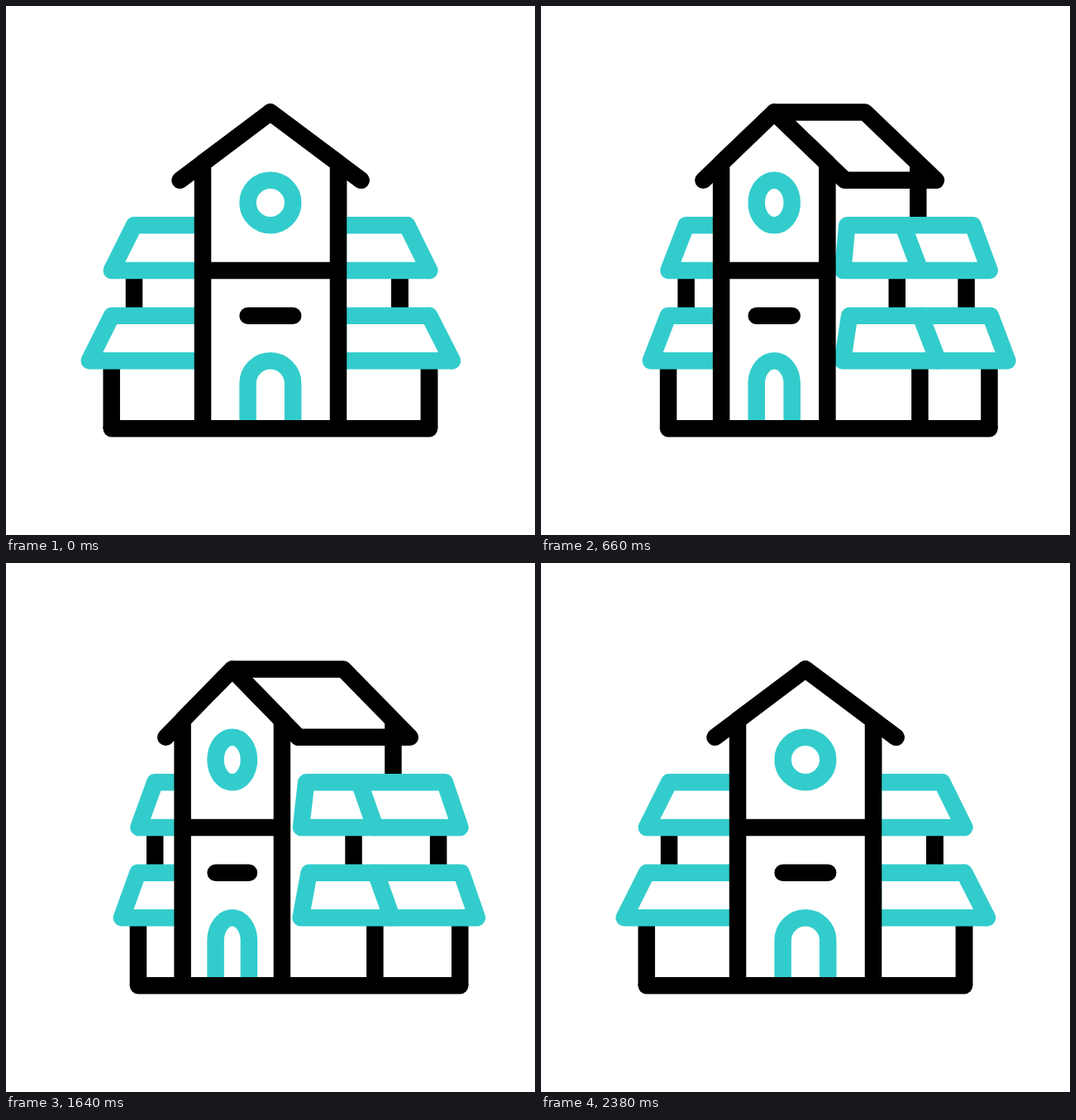
An HTML page without scripts that plays this animation: 640x640 px, repeating every 2.4 s.

```html
<!DOCTYPE html>
<html lang="en">
<head>
<meta charset="utf-8">
<title>Turning house</title>
<style>
  html, body { margin: 0; width: 100%; height: 100%; overflow: hidden; background: #fff; }
  svg { display: block; width: 100vw; height: 100vh; }
  path {
    fill: none;
    stroke: #000;
    stroke-width: 20.5;
    stroke-linejoin: round;
    animation: turn 1200ms cubic-bezier(.78, 0, .26, 1) -10ms infinite alternate;
  }
  .teal { stroke: #3cc; }
  .solid { fill: #fff; }
  .round { stroke-linecap: round; }
  /* each path morphs from its d to its turned pose */
  @keyframes turn { to { d: var(--to); } }
</style>
</head>
<body>
<svg viewBox="0 0 640 640">
  <!-- left wing -->
  <path d="M155 320V375" style="--to:path('M185.8 320V375')"/>
  <path d="M127.7 430V511" style="--to:path('M167.1 430V511')"/>
  <path class="teal" d="M238 265.3H155L127.7 320H238"
    style="--to:path('M208.2 265.3H185.8L167.6 320H208.2')"/>
  <path class="teal" d="M238 374.7H128L100.7 429.2H238"
    style="--to:path('M208.2 374.7H166.5L148.6 429.2H208.2')"/>

  <!-- main roof and back wall -->
  <path class="solid" d="M319.8 128.6H320L429.5 210.8H429.5Z"
    style="--to:path('M263.5 128.6H427.9L502 210.8H337Z')"/>
  <path d="M402 189V265" style="--to:path('M483.2 189V265')"/>

  <!-- right wing -->
  <path d="M476.4 320V375" style="--to:path('M408.1 320V375')"/>
  <path d="M476.4 320V375" style="--to:path('M533.5 320V375')"/>
  <path d="M512 430V511" style="--to:path('M431.8 430V511')"/>
  <path d="M512 430V511" style="--to:path('M557.5 430V511')"/>
  <path class="teal solid" d="M485 265.3H485.3L512.3 320H512Z"
    style="--to:path('M414.6 265.3H541L557.7 320H432Z')"/>
  <path class="teal solid" d="M402 265.3H485L512 320H402Z"
    style="--to:path('M354.5 265.3H414.6L432 320H347Z')"/>
  <path class="teal solid" d="M512 374.7H512L539.8 429.2H539.7Z"
    style="--to:path('M433 374.7H559.6L576.5 429.2H450.6Z')"/>
  <path class="teal solid" d="M402 374.7H512L539.7 429.2H402Z"
    style="--to:path('M358.8 374.7H433L450.6 429.2H346.5Z')"/>

  <!-- front -->
  <path class="solid" d="M238 511V190L319.8 128.6L402 190V511"
    style="--to:path('M208.2 511V190L263.5 128.6L318.8 190V511')"/>
  <path class="round" d="M210.5 210.8L319.8 128.6L429.5 210.8"
    style="--to:path('M189.4 210.8L263.5 128.6L337 210.8')"/>
  <path d="M238 320H402" style="--to:path('M208.2 320H318.8')"/>
  <path class="teal" d="M292.6 238A27.3 27.3 0 0 1 347.2 238A27.3 27.3 0 0 1 292.6 238Z"
    style="--to:path('M244.9 238A18.6 27.3 0 0 1 282.1 238A18.6 27.3 0 0 1 244.9 238Z')"/>
  <path class="round" d="M292.6 374.7H347.2" style="--to:path('M244.9 374.7H282.1')"/>
  <path class="teal" d="M292.6 511V456.6A27.3 27.3 0 0 1 347.2 456.6V511"
    style="--to:path('M244.9 511V456.6A18.6 27.3 0 0 1 282.1 456.6V511')"/>
  <path class="round" d="M127.7 511.2H512" style="--to:path('M167.1 511.2H557.5')"/>
</svg>
</body>
</html>
```
